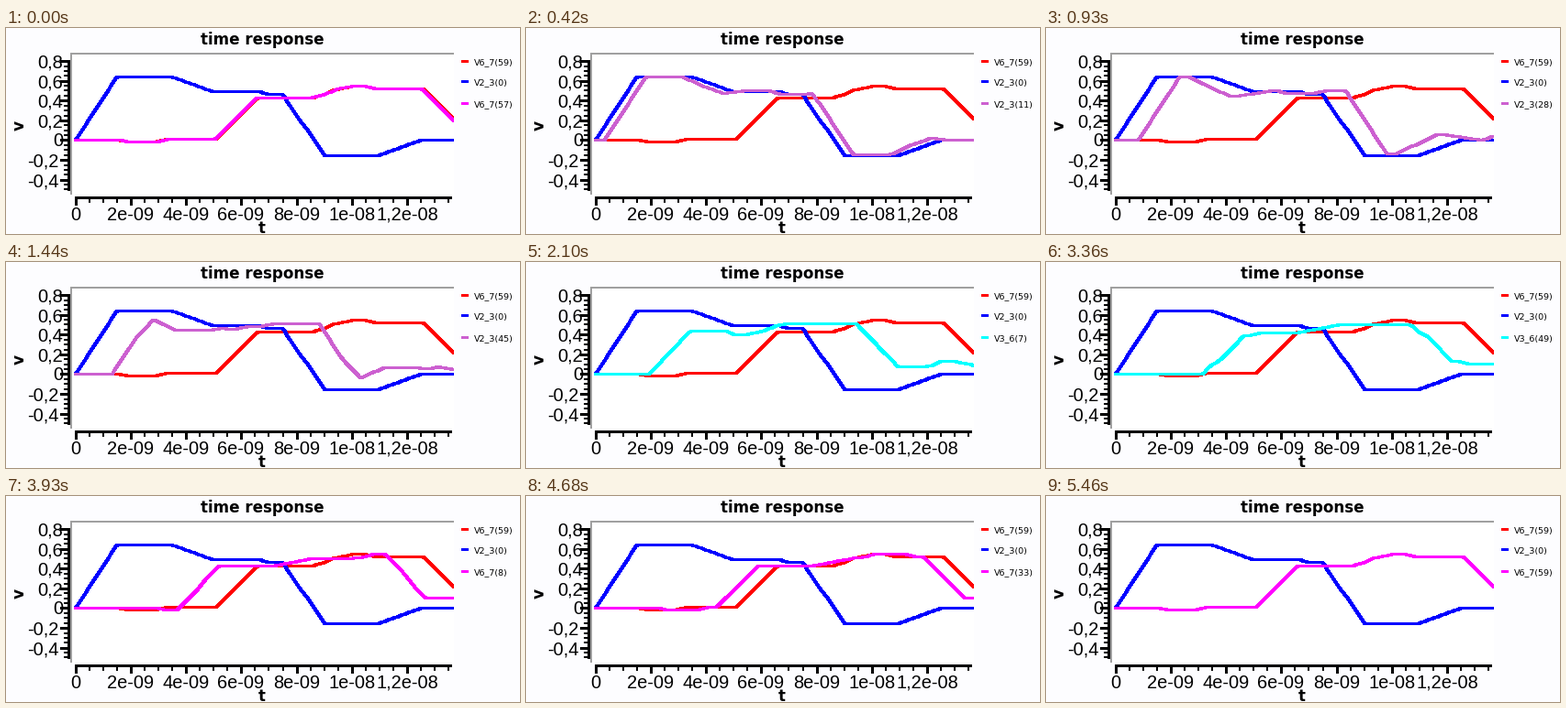
These frames come from a looping animation (560 px wide and 225 px high, 5.49 s). A matplotlib script:

```python
import numpy as np
import matplotlib.pyplot as plt
from matplotlib.animation import FuncAnimation
from matplotlib.patches import Rectangle

W, H, DPI = 560, 225, 100
FRAMES, STEP = 183, 30
CELLS = 60

X0, PX_NS = 75.8, 30.1        # time axis: pixel of zero, pixels per ns
Y0, PX_V = 122.5, 108.0       # voltage axis: pixel of zero, pixels per volt

LINES = [("V2_3", "#cc60d0"), ("V3_6", "#00ffff"), ("V6_7", "#ff00ff")]
NODES = [0, 1.74, 3.45, 5.1]  # arrival time of the front at each junction, ns
PULSE = 7.5                   # time between the rising and falling edge, ns

# Travelling ramps: direction, start at the first node, ramp time,
# amplitude at both ends of each line.
WAVES = [
    (+1, 0.00, 1.5, [(.64, .64), (.438, .425), (.42, .415)]),
    (-1, 3.48, 1.5, [(-.20, -.20), (0, 0), (0, 0)]),
    (+1, 3.48, 1.5, [(.05, .08), (.08, .08), (.08, .08)]),
    (-1, 6.65, 0.3, [(-.028, -.032), (-.037, -.037), (-.024, -.016)]),
    (-1, 8.05, 0.4, [(.025, .025), (.03, .03), (.028, .028)]),
    (-1, 13.7, 0.8, [(0, .02), (.022, .022), (.022, .022)]),
]

t = np.linspace(0, 13.7, 206)


def voltage(line, cell):
    u = cell / (CELLS - 1)
    tau = NODES[line] + u * (NODES[line + 1] - NODES[line])
    v = np.zeros_like(t)
    for direction, start, rise, amps in WAVES:
        a, b = amps[line]
        s = (t - start - direction * tau) / rise
        edge = np.clip(s, 0, 1) - np.clip(s - PULSE / rise, 0, 1)
        v += (a + (b - a) * u) * edge
    return v


def to_px(v):
    return np.round(Y0 - PX_V * v - 0.5) + 0.5


def pt(px):
    return px * 72 / DPI


def box(x, y, w, h, color="black"):
    ax.add_patch(Rectangle((x, y), w, h, fc=color, lw=0, antialiased=False))


def label(x, y, s, size, ha="center", va="baseline",
          font="Liberation Sans", **kw):
    return ax.text(x, y, s, fontsize=pt(size), ha=ha, va=va,
                   family=font, **kw)


def comma(v):
    return f"{v:g}".replace(".", ",")


fig = plt.figure(figsize=(W / DPI, H / DPI), dpi=DPI, facecolor="#fdfdff")
ax = fig.add_axes([0, 0, 1, 1])
ax.set_xlim(0, W)
ax.set_ylim(H, 0)
ax.axis("off")

# canvas with its sunken border
box(70, 27, 418, 155, "white")
box(70, 27, 418, 2, "#a0a0a0")
box(70, 27, 2, 155, "#a0a0a0")

# voltage axis
box(67, 35, 3, 143)
for i in range(-10, 17):
    y = round(Y0 - PX_V * i * 0.05) - 1
    major = i % 4 == 0
    n = 9 if major else 5
    box(68 - n, y, n, 3 if major else 2)
    if major:
        label(58 if i < 0 else 62, y + 8.3, comma(i * 0.05), 20, ha="right")

# time axis
box(75, 184, 411, 3)
for i in range(28):
    x = round(X0 + PX_NS * i * 0.5) - 1
    major = i % 4 == 0
    box(x, 186, 3 if major else 2, 8 if major else 5)
    if major and i <= 24:
        ns = i // 2
        s = "0" if ns == 0 else (f"{ns}e-09" if ns < 10
                                 else comma(ns / 10) + "e-08")
        label(x + 1, 210, s, 20)

bold = dict(font="DejaVu Sans", weight="bold")
label(279.5, 18.5, "time response", 16.8, **bold)
label(278.5, 224, "t", 16.5, **bold)
label(14.5, 106, "v", 17, va="center", rotation=90, **bold)


def trace(color):
    line, = ax.plot([], [], color=color, lw=pt(3), antialiased=False,
                    solid_joinstyle="round", solid_capstyle="round")
    line.set_clip_path(Rectangle((72, 29), 415.5, 153,
                                 transform=ax.transData))
    return line


def legend(y, text, color):
    mark = Rectangle((496, y - 1), 8, 3, fc=color, lw=0, antialiased=False)
    ax.add_patch(mark)
    return mark, label(510, y + 4, text, 9.5, ha="left", font="DejaVu Sans")


x_px = X0 + PX_NS * t
trace("#ff0000").set_data(x_px, to_px(voltage(2, CELLS - 1)))
trace("#0000ff").set_data(x_px, to_px(voltage(0, 0)))
legend(36, "V6_7(59)", "#ff0000")
legend(58, "V2_3(0)", "#0000ff")
probe = trace("#ff00ff")
mark, caption = legend(82, "", "#ff00ff")


def update(i):
    # the loop opens on the last three cells of the last line
    line, cell = divmod((i - 3) % (CELLS * len(LINES)), CELLS)
    name, color = LINES[line]
    probe.set_data(x_px, to_px(voltage(line, cell)))
    probe.set_color(color)
    mark.set_facecolor(color)
    caption.set_text(f"{name}({cell})")
    return probe, mark, caption


anim = FuncAnimation(fig, update, frames=FRAMES, interval=STEP,
                     repeat=True, repeat_delay=0, blit=False)
plt.show()
```
